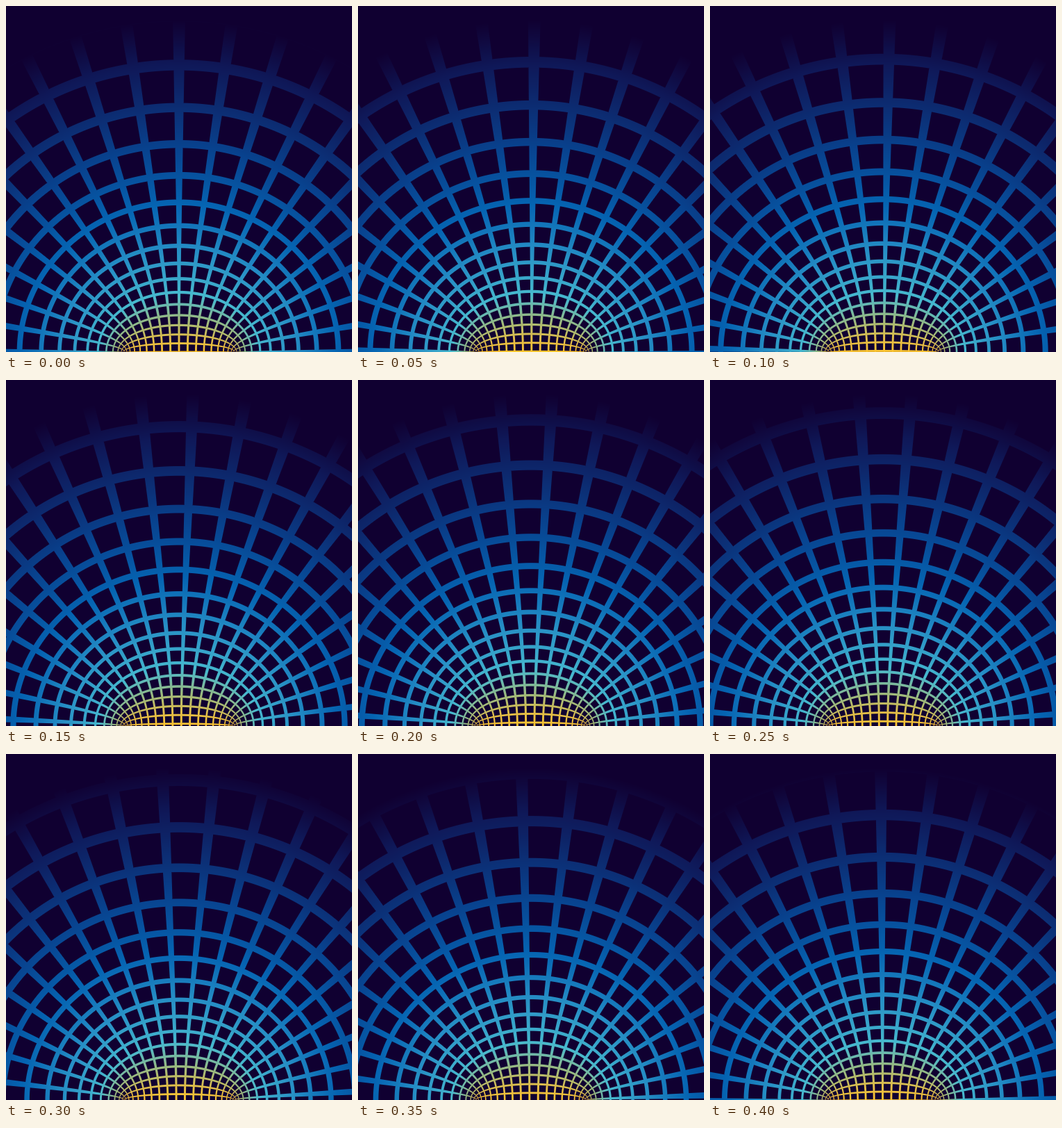
Write an HTML page with a canvas that moves like this. It is 498 px wide and 498 px high and loops after 450 ms.

```html
<!DOCTYPE html>
<html lang="en">
<head>
<meta charset="utf-8">
<title>Elliptic grid</title>
<style>
  html, body { margin: 0; width: 100%; height: 100%; overflow: hidden; background: rgb(16, 0, 49); }
  canvas { display: block; width: 100%; height: 100%; }
</style>
</head>
<body>
<canvas id="stage" width="498" height="498"></canvas>
<script>
const SIZE = 498;
const LOOP = 450, TICK = 50;
const CENTER_X = 249, BASE_Y = 498;
const FOCUS = 79;              // half distance between the two foci
const CELL = Math.PI / 20;     // grid step in elliptic coordinates
const HALF_LINE = 0.117;       // half line width, as a share of a cell
const BACKGROUND = [16, 0, 49];

// Line colour by elliptic radius: [radius, r, g, b]
const STOPS = [
  [0, 252, 196, 48],
  [0.25, 226, 190, 72],
  [0.6, 150, 185, 130],
  [0.93, 70, 184, 206],
  [1.4, 36, 140, 196],
  [1.72, 5, 100, 178],
  [2.03, 8, 66, 142],
  [2.2, 12, 45, 115],
  [2.36, 15, 24, 88],
  [2.5, ...BACKGROUND]
];

const clamp = (x, lo, hi) => Math.min(hi, Math.max(lo, x));

function lineColor(radius) {
  const i = STOPS.findIndex(stop => stop[0] > radius);
  if (i < 0) return BACKGROUND;
  const a = STOPS[i - 1], b = STOPS[i];
  const k = (radius - a[0]) / (b[0] - a[0]);
  return [1, 2, 3].map(c => a[c] + (b[c] - a[c]) * k);
}

// Elliptic coordinates, in cells, for the centre of every pixel
const points = [];
for (let py = 0; py < SIZE; py++) {
  for (let px = 0; px < SIZE; px++) {
    const x = px + 0.5 - CENTER_X, y = BASE_Y - py - 0.5;
    const left = Math.hypot(x + FOCUS, y), right = Math.hypot(x - FOCUS, y);
    const radius = Math.acosh(Math.max(1, (left + right) / (2 * FOCUS)));
    const angle = Math.asin(clamp((left - right) / (2 * FOCUS), -1, 1));
    points.push({
      row: radius / CELL,
      column: angle / CELL,
      cellSize: Math.sqrt(left * right) * CELL,
      color: lineColor(radius)
    });
  }
}

// Antialiased coverage of the nearest grid line
function coverage(position, cellSize) {
  const distance = Math.abs(position - Math.round(position));
  const peak = Math.min(1, 2 * HALF_LINE * cellSize);
  return clamp((HALF_LINE - distance) * cellSize + 0.5, 0, peak);
}

// Share of a cell travelled; the motion is slower around the loop point
function travel(time) {
  if (time < 100) return 0.125 * time / 100;
  if (time < 400) return 0.125 + 0.835 * (time - 100) / 300;
  return 0.96 + 0.04 * (time - 400) / 50;
}

const context = document.getElementById("stage").getContext("2d");

function render(shift) {
  const image = context.createImageData(SIZE, SIZE);
  points.forEach(({ row, column, cellSize, color }, i) => {
    const alpha = Math.max(coverage(row - shift, cellSize), coverage(column - shift, cellSize));
    for (let c = 0; c < 3; c++) {
      image.data[i * 4 + c] = BACKGROUND[c] + (color[c] - BACKGROUND[c]) * alpha;
    }
    image.data[i * 4 + 3] = 255;
  });
  return image;
}

const images = [];
let shown = -1;
const start = performance.now();

function draw() {
  const step = Math.floor((performance.now() - start) % LOOP / TICK);
  if (step !== shown) {
    images[step] ||= render(travel(step * TICK));
    context.putImageData(images[step], 0, 0);
    shown = step;
  }
  requestAnimationFrame(draw);
}
draw();
</script>
</body>
</html>
```
